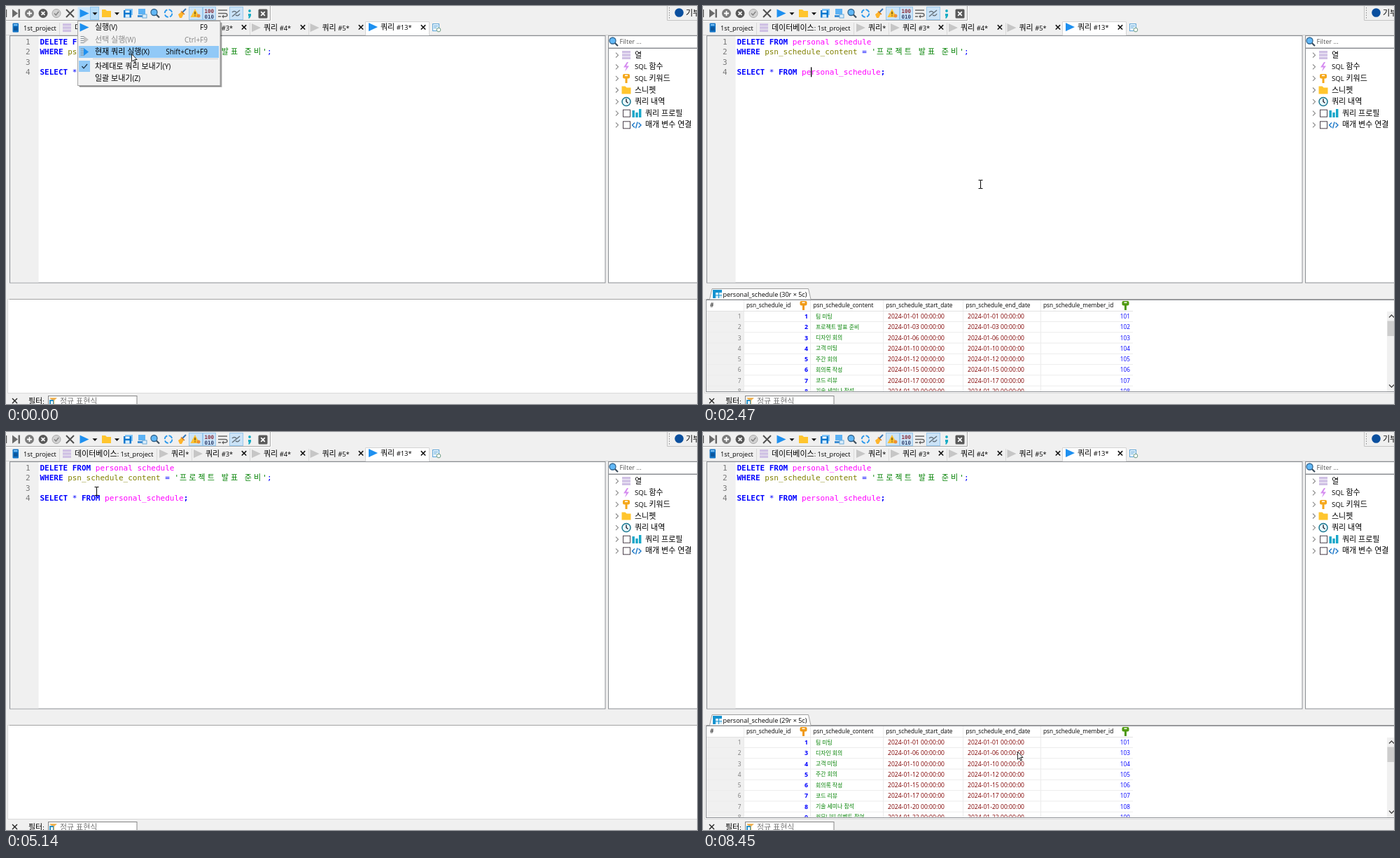
An HTML page that plays this animation: 987x568 px, repeating every 8.48 s.

```html
<!DOCTYPE html>
<html lang="ko">
<head>
<meta charset="utf-8">
<title>Query editor</title>
<style>
html, body { margin: 0; width: 100%; height: 100%; overflow: hidden; background: #f0f0f0; }
svg { display: block; width: 987px; height: 568px; }
text { font-family: "Open Sans", "Noto Sans CJK KR", "Noto Sans CJK JP", sans-serif; white-space: pre; }
.code { font-family: "DejaVu Sans Mono", "Noto Sans CJK KR", "Noto Sans CJK JP", monospace; font-size: 11px; }
.b { font-weight: 700; }
.end { text-anchor: end; }
</style>
</head>
<body>
<svg id="stage" viewBox="0 0 987 568" xmlns="http://www.w3.org/2000/svg"></svg>
<script>
const LOOP = 8480, BLINK = 530, CELL = 6.622;
const BLUE = '#1e90f0', GRAY = '#6a6a6a';

// Drawing helpers
const rect = (x, y, w, h, fill, stroke = 'none', more = '') =>
  `<rect x="${x}" y="${y}" width="${w}" height="${h}" fill="${fill}" stroke="${stroke}" ${more}/>`;
const path = (d, fill, stroke = 'none', width = 1) =>
  `<path d="${d}" fill="${fill}" stroke="${stroke}" stroke-width="${width}"/>`;
const line = (d, stroke, width = 1) => path(d, 'none', stroke, width);
const circle = (x, y, r, fill, stroke = 'none', width = 1) =>
  `<circle cx="${x}" cy="${y}" r="${r}" fill="${fill}" stroke="${stroke}" stroke-width="${width}"/>`;
const group = (id, body, more = '') => `<g id="${id}" ${more}>${body}</g>`;
const text = (x, y, s, size = 9.2, fill = '#000', cls = '', hangul = 11) =>
  `<text x="${x}" y="${y}" font-size="${size}" fill="${fill}" class="${cls}">` +
  s.replace(/[가-힣]+( [가-힣]+)*/g, m => `<tspan font-size="${hangul}">${m}</tspan>`) + '</text>';
const play = (x, y, fill) => path(`M${x} ${y - 6}l13 6l-13 6z`, fill);
const cross = (x, y, r, color, width) =>
  line(`M${x - r} ${y - r}l${2 * r} ${2 * r}M${x + r} ${y - r}l${-2 * r} ${2 * r}`, color, width);
const folder = (x, y) => path(`M${x} ${y}h5l2 2h6v9h-13z`, '#ffc52e');
const drop = x => path(`M${x - 3.5} 9.3h7l-3.5 3.7z`, '#111');
const lens = (x, y) => line(`M${x + 3} ${y + 3}l4.5 4.5`, '#3d4f5e', 2.2) + circle(x, y, 4.5, '#62b8f7', '#31638c', 1.3);
const key = (x, y, c) => path(`M${x - 1.5} ${y}h3v8h-3z`, c) + rect(x - 5, y - 5, 10, 6.5, c, 'none', 'rx="2"') +
  rect(x - 2, y - 3.5, 4, 1.6, '#fff');
const bars = (x, y) => [0, 4.3, 8.6].map(d => rect(x, y + d, 12, 3.4, '#cfc0e4')).join('');

// One line of code in fixed cells; each Hangul syllable takes two
function code(row, col, s, fill, cls = '') {
  const y = 54.5 + row * 14.6;
  let out = '';
  for (const part of s.match(/[가-힣]|[^가-힣]+/g)) {
    const wide = /[가-힣]/.test(part);
    out += `<text class="code ${cls}" x="${48.4 + col * CELL + (wide ? 1 : 0)}" y="${y}" fill="${fill}">${part}</text>`;
    col += wide ? 2 : part.length;
  }
  return out;
}

function toolbar() {
  const on = (x, w) => rect(x + .5, 1.5, w, 18, '#cbe3f7', '#9ac8ec');
  return line('M0 20.5H377.5V0', '#a8a8a8') + line('M0 21.5H378.5V0', '#fff') +
    rect(0, 5, 1.2, 11, '#555') +
    path('M9 4.5l8 6l-8 6z', GRAY) + rect(17.5, 4.5, 2.5, 12, GRAY) +
    circle(33.5, 10.5, 6.5, '#7c7c7c') + line('M30 10.5h7M33.5 7v7', '#fff', 1.8) +
    circle(53, 10.5, 6.5, '#585858') + cross(53, 10.5, 2.4, '#fff', 1.7) +
    circle(72, 10.5, 6, '#d2d2d2', '#a9a9a9') + line('M69 10.5l2.3 2.5l4-5', '#808080', 1.4) +
    cross(91.5, 10.5, 5.5, '#505050', 2) +
    group('btn', rect(102.5, 1.5, 30, 18, '#cce6fb') + rect(120.5, 1.5, 12, 18, '#b4dbf8', '#8ec6f0')) +
    play(105.5, 10.5, BLUE) + drop(127) + folder(137, 5) + drop(158.5) +
    rect(170, 4, 11, 9, '#7fc4f8') + rect(168, 6, 11, 10.5, '#0a78cf') + rect(170.5, 6.5, 6, 3, '#fff') + rect(170.5, 12, 6, 4.5, '#d6ecfc') +
    rect(189, 4, 10, 8, '#5cb2f5') + rect(188, 13, 9, 3, '#3f8fd4') + rect(195, 12, 6, 5, '#dceefb', '#6aa9d8') +
    lens(211.5, 9) +
    `<circle cx="232" cy="10.5" r="5.3" fill="none" stroke="#2f9bec" stroke-width="1.8" stroke-dasharray="6 2.3"/>` +
    line('M251 10l6-6', '#3878b8', 2) + path('M246 12l5-4l3 3l-3 6h-3z', '#ffb52c') + line('M250 7.5l5 4.5', '#d27a20', 1.5) +
    on(261, 19) + path('M270 4l6.5 12h-13z', '#ffc233') + line('M270 8v4M270 13.3v1.2', '#5a4300', 1.3) + circle(275, 14, 2.5, '#ed8f36') +
    on(281, 18) + text(283.5, 9.5, '100', 7.5, '#8b2a36', 'code b" style="font-size:7.5px') +
    text(283.5, 17.5, '010', 7.5, '#30406e', 'code b" style="font-size:7.5px') +
    line('M303 6h13M303 10.5h10q3 0 3 2.5q0 2-3 2h-3M303 15h4', '#666', 1.4) + path('M311 12.5v5l-3-2.5z', '#666') +
    on(319, 19) + line('M323 15l11-9M323 9q3-3 6 0M328 13q4 2 6-2', '#66727c', 1.5) +
    circle(348, 7, 1.9, '#16acc4') + path('M346 11h4v3l-2 3.5h-2l1-3h-1z', '#16acc4') +
    rect(360.5, 4.5, 13, 13, '#595959', 'none', 'rx="1.5"') + cross(367, 11, 2.8, '#fff', 1.7) +
    line('M944.5 0V20.5H987', '#c4c4c4') + line('M947.5 2v16', '#8c8c8c').replace('/>', ' stroke-dasharray="1.5 2"/>') +
    circle(961.5, 9.5, 6.3, '#0a4f9e') + text(971, 13.5, '기부');
}

function tabs() {
  const idle = [[219, '쿼리*'], [268, '쿼리 #3*', 340], [351, '쿼리 #4*', 424], [434.5, '쿼리 #5*', 507]];
  return line('M0 41.5H987', '#d0d0d0') +
    line('M76.5 24v17M215.5 24v17M265.5 24v17M348.5 24v17M432.5 24v17', '#d9d9d9') +
    rect(9.5, 24.5, 8.5, 13, '#1273c4', 'none', 'rx="1"') + rect(11, 26, 5.5, 2, '#79c0f5') + rect(11, 30, 5.5, 5, '#0b559b') +
    text(25, 34.7, '1st_project') + bars(81, 25) + text(98, 34.7, '데이터베이스: 1st_project') +
    idle.map(([x, s, end]) => play(x, 31, '#c6c6c6') + text(x + 17, 34.5, s, 9.3) +
      (end ? cross(end, 30.3, 3.2, '#111', 1.5) : '')).join('') +
    path('M513.5 42V22.5H604.5V42', '#fff', '#d4d4d4') + play(518, 30, BLUE) +
    text(535, 33.7, '쿼리 #13*', 9.4) + cross(596, 30.3, 3.2, '#111', 1.5) +
    rect(609.5, 25.5, 9, 10, '#e6f3fc', '#5fa6d8') + line('M611 28.5h6M611 31h4', '#5fa6d8') + circle(618, 34, 2.8, '#fff', '#6f9d85');
}

function editor() {
  return rect(5.5, 42.5, 850.5, 352.5, '#fff', '#8b8e93') + rect(6, 43, 40.5, 351.5, '#f0f0f0') +
    [0, 1, 2, 3].map(i => `<text class="code end" x="34.6" y="${54.5 + i * 14.6}" fill="#777">${i + 1}</text>`).join('') +
    code(0, 0, 'DELETE FROM', '#00f', 'b') + code(0, 12, 'personal', '#f0f') +
    group('under', code(0, 20, '_', '#f0f')) + code(0, 21, 'schedule', '#f0f') +
    code(1, 0, 'WHERE', '#00f', 'b') + code(1, 6, 'psn_schedule_content', '#808000') + code(1, 27, '=', '#00f') +
    code(1, 29, "'프로젝트", '#008000') + code(1, 39, '발표', '#008000') + code(1, 44, "준비'", '#008000') + code(1, 49, ';', '#00f') +
    code(3, 0, 'SELECT', '#00f', 'b') + code(3, 7, '*', '#00f') + code(3, 9, 'FROM', '#00f', 'b') +
    code(3, 14, 'personal_schedule', '#f0f') + code(3, 31, ';', '#00f', 'b') +
    rect(0, 0, 1.3, 14, '#000', 'none', 'id="caret"');
}

function sidebar() {
  const names = ['열', 'SQL 함수', 'SQL 키워드', '스니펫', '쿼리 내역', '쿼리 프로필', '매개 변수 연결'];
  const icons = [
    bars(880, 64), path('M887 80l-5 7.5h4l-2 6l6-8h-4l3-5.500z', '#d58cf0'), key(886, 102, '#f5a81c'), folder(879.5, 114.5),
    circle(886, 136.5, 6, '#e9f8fc', '#1a7791', 1.5) + line('M886 132.500v4l2.500 2', '#223', 1.4),
    rect(894.5, 149, 3.4, 10, '#16a6c9') + rect(899.3, 152, 3.4, 7, '#16a6c9') + rect(904, 147, 3.4, 12, '#16a6c9'),
    line('M898 166.500l-3.500 3.500l3.500 3.500M903.500 166.500l3.500 3.500l-3.500 3.500M902 165.500l-2.500 9', '#1976c8', 1.4)
  ];
  return rect(860.5, 42.5, 130, 17.500, '#fff', '#8b8e93') + lens(866.5, 49.5) + text(876.500, 54.3, 'Filter ...', 9.2, '#555') +
    rect(860.5, 60.5, 130, 334.5, '#fff', '#8b8e93') +
    names.map((s, i) => {
      const y = 70.2 + i * 16.6, box = i > 4;
      return line(`M871 ${y - 3.500}l3.500 3.500l-3.500 3.500`, '#888', 1.1) + icons[i] +
        (box ? rect(881.5, y - 5, 10, 10, '#fff', '#4a3f4a') : '') + text(box ? 913 : 898, y + 3.500, s, 9.700);
    }).join('');
}

function footer() {
  return rect(2.5, 418.5, 990, 134, '#fff', '#dadada') + line('M5 418.500H987', '#a3a3a3') +
    cross(12.500, 563.500, 3.500, '#222', 1.4) + text(32, 567.800, '필터:') +
    rect(60.5, 556.5, 126.500, 16, '#fff', '#858585') + path('M62 559h11l-4 4v5h-3v-5z', '#f0b254') +
    rect(62, 562, 6, 6, '#2a92c8') + rect(64, 564, 3, 4, '#fff') + text(77, 567.800, '정규 표현식', 9.2, '#777');
}

// Result grid; skip drops one record
function results(id, count, skip) {
  const days = [1, 3, 6, 10, 12, 15, 17, 20, 22];
  const notes = ['팀 미팅', '프로젝트 발표 준비', '디자인 회의', '고객 미팅', '주간 회의', '회의록 작성', '코드 리뷰', '기술 세미나 참석', '커뮤니티 이벤트 참여'];
  const heads = [[10, '#'], [62, 'psn_schedule_id'], [157.500, 'psn_schedule_content'], [261.500, 'psn_schedule_start_date'],
    [375.500, 'psn_schedule_end_date'], [486, 'psn_schedule_member_id']];
  let rows = '', n = 0;
  days.forEach((d, i) => {
    if (i + 1 === skip || n > 7) return;
    const y = 446 + 15.28 * n++, date = `2024-01-${String(d).padStart(2, '0')} 00:00:00`;
    rows += text(54.500, y, '' + n, 8.2, '#777', 'end') + text(150, y, '' + (i + 1), 8.800, '#00f', 'b end') +
      text(161, y - .5, notes[i], 8.500, '#008000', '', 7.900) + text(264, y, date, 8.58, '#800000') +
      text(378, y, date, 8.58, '#800000') + text(610, y, '' + (101 + i), 8.300, '#00f', 'end') +
      line(`M5 ${y + 4.500}H614`, '#ececec');
  });
  return group(id,
    path('M9.500 418.500L13 403.500H150.500L154 418.500', '#fff', '#a0a0a0') +
    rect(14, 405, 13, 12, '#1592cf') + rect(18, 409, 9, 8, '#d7effb') + line('M18 413h9M22.500 409v8', '#1592cf') +
    text(28.500, 415.300, `personal_schedule (${count}r × 5c)`, 9.06) +
    rect(4.5, 419.5, 990, 131, '#fff', '#8b8e93') + rect(5, 435, 53, 115, '#f0f0f0') +
    line('M58.500 420V550M153.500 420V550M257.500 420V550M371.500 420V550M482.500 420V550', '#ebebeb') + line('M5 435.500H614', '#e2e2e2') +
    heads.map(([x, s]) => text(x, 430.300, s, 8.300)).join('') + key(143.500, 426, '#f09a16') + key(603.500, 426, '#4f9a10') +
    `<g clip-path="url(#grid)">${rows}</g>` +
    rect(977, 436, 10, 114, '#f0f0f0') + rect(977.500, 449.500, 10, 21.500, '#cdcdcd') +
    line('M980 444.500l3.500-3.500l3.500 3.500M980 540.500l3.500 3.500l3.500-3.500', '#444', 1.3));
}

function menu() {
  const items = [[34, '실행(V)', 'F9'], [51.500, '선택 실행(W)', 'Ctrl+F9'], [68.800, '현재 쿼리 실행(X)', 'Shift+Ctrl+F9'],
    [89.800, '차례대로 쿼리 보내기(Y)', ''], [107.200, '일괄 보내기(Z)', '']];
  const sheet = (y, c) => line(`M106.500 ${y - 4}h5M106.500 ${y - 1}h5M106.500 ${y + 2}h5M106.500 ${y + 5}h5`, '#7f8b94') +
    path(`M111 ${y - 5}l7 5.500l-7 5.500z`, c);
  return group('menu',
    rect(105, 24, 203.500, 92, '#000', 'none', 'opacity=".28"') + rect(104, 23, 203.500, 92, '#000', 'none', 'opacity=".25"') +
    rect(102.500, 21.500, 203.500, 92, '#f2f2f2', '#a5a5a5') + rect(104, 57, 200, 17, '#91c9f7', 'none', 'id="hover"') +
    line('M124 75.500H303', '#d0d0d0') + rect(104, 78, 16, 16, '#91c9f7') + line('M108.500 86l2.500 2.800l5-5.800', '#1c2c3c', 1.2) +
    play(105.500, 30.500, BLUE) + sheet(47.500, '#c2c2c2') + sheet(65, BLUE) +
    items.map(([y, s, k], i) => {
      const c = i === 1 ? '#888' : '#000';
      return text(127, y, s, 9.900, c) + text(288, y, k, 10, c, 'end');
    }).join(''));
}

document.getElementById('stage').innerHTML =
  '<clipPath id="grid"><rect x="5" y="436" width="972" height="113.500"/></clipPath>' +
  rect(0, 0, 987, 568, '#f0f0f0') + toolbar() + tabs() + editor() + sidebar() + footer() +
  results('before', 30, 0) + results('after', 29, 2) + menu() +
  group('arrow', path('M0 0V10.800L2.500 8.500L4.300 12.700L6 12L4.200 8H7.600Z', '#fff', '#111', .9)) +
  group('beam', line('M-3 -6h2.200l.8 .8l.8-.8H3M0-5.200V5.200M-3 6h2.200l.8-.8l.8 .8H3', '#111', 1.1));

// Timeline: pointer stops [ms, x, y]
const stops = [
  [0, 179, 68], [340, 179, 68], [960, 181, 128], [1120, 181, 128], [1540, 235, 500], [1660, 235, 500],
  [1940, 520, 476], [2080, 655, 455], [2800, 197, 98], [2930, 156, 72], [3110, 156, 72], [3420, 133, 18],
  [3500, 128, 13], [3950, 128, 13], [4260, 155, 56], [4450, 172, 66], [4580, 172, 66], [4820, 165, 112],
  [5140, 129, 84], [5280, 129, 93], [5730, 129, 93], [6200, 128, 13], [6820, 128, 13], [7220, 165, 66],
  [7410, 165, 66], [7650, 155, 190], [8050, 560, 488], [8420, 449, 456], [LOOP, 449, 456]
];
const menus = [[-500, 310], [3590, 4560], [6290, 7400]];
const carets = [[310, 154, 87.300], [2940, 154, 58.200], [4560, 154, 58.200], [5300, 129, 87.300], [7400, 129, 87.300]];

const $ = id => document.getElementById(id);
const show = (id, on) => $(id).setAttribute('visibility', on ? 'visible' : 'hidden');
const ease = p => p * p * (3 - 2 * p);

function pointer(t) {
  const i = stops.findIndex(s => s[0] > t), a = stops[i - 1], b = stops[i];
  const p = ease((t - a[0]) / (b[0] - a[0]));
  return [a[1] + (b[1] - a[1]) * p, a[2] + (b[2] - a[2]) * p];
}

function draw(t) {
  const [x, y] = pointer(t), open = menus.find(m => t >= m[0] && t < m[1]);
  const inText = !open && x > 46 && x < 856 && y > 43 && y < 395;

  show('menu', open);
  show('btn', open || (y < 18 && x > 102 && x < 133));
  if (open) $('menu').setAttribute('opacity', Math.min(1, (t - open[0]) / 170));
  const item = y < 22 ? -1 : y < 39 ? 0 : y < 56.500 ? 1 : y < 75 ? 2 : -1;
  show('hover', open && item >= 0);
  $('hover').setAttribute('y', [22, 39.500, 57][item] || 22);
  $('hover').setAttribute('fill', item === 1 ? '#e5e5e5' : '#91c9f7');

  show('before', t >= 450 && t < 4620);
  show('after', t >= 7500);
  show('under', t >= 7400);

  const caret = carets.filter(c => c[0] <= t).pop();
  show('caret', caret && Math.floor((t - caret[0]) / BLINK) % 2 === 0);
  if (caret) {
    $('caret').setAttribute('x', caret[1]);
    $('caret').setAttribute('y', caret[2]);
  }

  show('arrow', !inText);
  show('beam', inText);
  $(inText ? 'beam' : 'arrow').setAttribute('transform', `translate(${Math.round(x) + .5} ${Math.round(y) + .5})`);
}

const start = performance.now();
function tick() {
  draw((performance.now() - start) % LOOP);
  requestAnimationFrame(tick);
}
tick();
</script>
</body>
</html>
```
